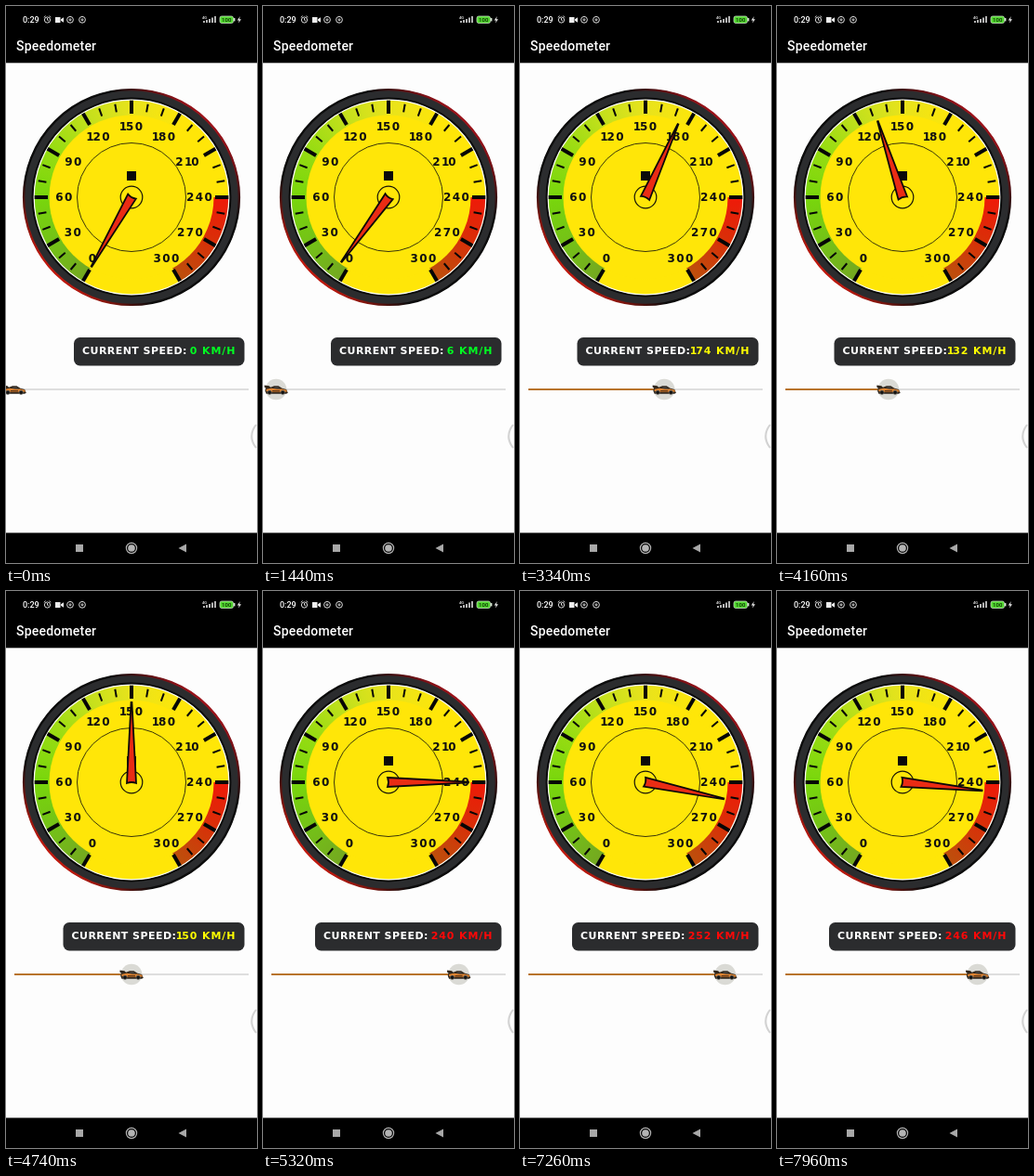
Animation, 270 px wide and 600 px high, one loop 8000 ms. Source, as an HTML page:

```html
<!DOCTYPE html>
<html lang="en">
<head>
<meta charset="utf-8">
<title>Speedometer</title>
<style>
  html, body { margin: 0; width: 100%; height: 100%; overflow: hidden; background: #fdfdfd; }
  #band, svg { position: absolute; }
  #band {
    left: 30px; top: 101px; width: 210px; height: 210px; border-radius: 50%;
    background: conic-gradient(from 210deg,
      #74a820 0deg, #74c018 28deg, #78d60c 60deg, #98dc12 92deg, #c4e01c 122deg,
      #e8e31c 150deg, #ffe608 185deg 240deg,
      #ee1a08 240deg, #dc2c08 265deg, #bc500c 300deg, #ffe608 300deg);
  }
  svg { left: 0; top: 0; display: block; }
  .ui { font-family: Roboto, sans-serif; font-weight: 500; fill: #fff; }
  .tech { font-family: "DejaVu Sans", sans-serif; font-weight: 700; }
  #labels { font-size: 12px; letter-spacing: 1.4px; text-anchor: middle; fill: #101010; }
  #readout { font-size: 11px; letter-spacing: .45px; }
  #value { letter-spacing: .9px; }
  .one { letter-spacing: -1.2px; }
</style>
</head>
<body>
<div id="band"></div>
<svg width="270" height="600" viewBox="0 0 270 600">
  <defs>
    <linearGradient id="rim" x1="0" y1="1" x2="1" y2="0">
      <stop offset=".12" stop-color="#e01c10"/>
      <stop offset=".3" stop-color="#0c0c0c"/>
      <stop offset=".7" stop-color="#0c0c0c"/>
      <stop offset=".88" stop-color="#b4141c"/>
    </linearGradient>
  </defs>

  <rect width="270" height="61.3"/>
  <g class="ui">
    <text x="18" y="18" font-size="9">0:29</text>
    <text x="11" y="48" font-size="14" letter-spacing=".2">Speedometer</text>
    <text x="211" y="14" font-size="4">4G</text>
  </g>
  <g fill="none" stroke="#ddd" stroke-width="1">
    <circle cx="44.5" cy="15" r="3.1"/>
    <path d="M44.5 13v2.2l1.4 .8M40.8 12.3l1.8-1.6M48.2 12.3l-1.8-1.6"/>
    <circle cx="69" cy="14.8" r="3.4"/><circle cx="69" cy="14.8" r="1"/>
    <circle cx="82" cy="14.8" r="3.4"/><circle cx="82" cy="14.8" r="1"/>
  </g>
  <path fill="#eee" d="M53 12h5.5v6H53zM59 14.2l3-2v5.6l-3-2z"/>
  <path stroke="#eee" stroke-width="1.5" d="M213 18v-2M216 18v-3M219 18v-4M222 18v-5.5M225 18v-7"/>
  <rect x="230" y="11" width="14.5" height="7.5" rx="2" fill="#52d830" stroke="#d8e8d4" stroke-width=".7"/>
  <rect x="245" y="13" width="1.4" height="3.4" fill="#d8e8d4"/>
  <text x="237.2" y="17" font-size="6" text-anchor="middle" class="ui" style="fill:#0c2804">100</text>
  <path d="M251.8 11l-3 4.4h2l-.8 3.2 3-4.4h-2z" fill="#eee"/>

  <g transform="translate(135 206)">
    <circle r="88.5" fill="#ffe608"/>
    <circle r="110.8" fill="none" stroke="#2b2c2e" stroke-width="11.5"/>
    <circle r="115.9" fill="none" stroke="url(#rim)" stroke-width="2.4"/>
    <circle r="106.4" fill="none" stroke="#0a0a0a" stroke-width="2"/>
    <circle r="104.8" fill="none" stroke="#fdfdf4" stroke-width="1.2"/>
    <g id="ticks" stroke="#060606"></g>
    <circle r="58.5" fill="none" stroke="#22200a" stroke-width=".9"/>
    <rect x="-5" y="-28" width="10" height="10" fill="#0a0a0a"/>
    <circle r="11.8" fill="#ffe608" stroke="#141208" stroke-width="1.2"/>
  </g>
  <g id="labels" class="tech"></g>
  <path id="needle" d="M-5 1L-.4-86H.4L5 1Q0-1-5 1Z" fill="#ea2c14" stroke="#0c0808" stroke-width="1.8"/>

  <g id="readout" class="tech">
    <rect id="box" y="357" height="30.5" rx="6.5" fill="#2b2c2e"/>
    <text id="caption" y="375" fill="#fff">CURRENT SPEED:</text>
    <text id="value" x="247.4" y="375" text-anchor="end"></text>
  </g>

  <path d="M9 413H261" stroke="#dedede" stroke-width="1.8"/>
  <path id="active" stroke="#b8742c" stroke-width="1.8"/>
  <g id="thumb">
    <circle id="halo" r="11.3" fill="#d6d6d0" opacity=".9"/>
    <g transform="translate(0 .8)">
      <path d="M-12.5-5.2l5 .6 1.5 1.6L-2-4.6H2.500l4 2.600 4.600 1.200L12.800 3 11 4h-21.500l-1.300-3 .6-3.600-1.300-.4z" fill="#30261c"/>
      <path d="M-10.500-1L-5-2 1-1.400l5 .200 5.400 1.200.4 1.600-6.800.4h-8.500l-7-.8z" fill="#e08430"/>
      <path d="M-3-1.800L-1-3.600H1.800L4.800-1.400z" fill="#44403c"/>
      <path d="M-4 .9H4" stroke="#4a2a14" stroke-width="1.100"/>
      <g fill="#131313" stroke="#807c74" stroke-width=".6">
        <circle cx="-7" cy="2.500" r="2.200"/><circle cx="7.200" cy="2.500" r="2.200"/>
      </g>
    </g>
  </g>

  <path d="M269 451Q259.500 463.500 269 476" fill="none" stroke="#d2d2d2" stroke-width="2"/>

  <rect y="567.5" width="270" height="32.5"/>
  <rect x="75" y="580" width="8" height="8" fill="#a8a8a8"/>
  <circle cx="135" cy="584" r="5.6" fill="none" stroke="#b4b4b4" stroke-width="1.2"/>
  <circle cx="135" cy="584" r="3.8" fill="#b4b4b4"/>
  <path d="M194 579.5v9l-8.500-4.500z" fill="#a8a8a8"/>
</svg>
<script>
  const $ = id => document.getElementById(id);
  const LOOP = 8000, STEP = 6, MAX = 300;

  // [ms, km/h] along the drag
  const drag = [
    [0, 0], [1200, 0], [2060, 25], [2350, 80], [3300, 176], [3380, 176],
    [4160, 132], [4490, 126], [4580, 126], [5290, 240], [5400, 240],
    [6420, 252], [7050, 252], [7860, 246], [8000, 246]
  ];

  const narrowOnes = s => s.replace(/1/g, '<tspan class="one">1</tspan>');

  function buildDial() {
    let ticks = '';
    for (let v = 0; v <= MAX; v += 10) {
      const major = v % 30 === 0;
      ticks += `<path d="M0 ${major ? -90 : -93}V${major ? -104.3 : -101.8}"
        stroke-width="${major ? 4 : 2}" transform="rotate(${v - 150})"/>`;
    }
    $('ticks').innerHTML = ticks;

    const xs = [93, 72, 62.5, 72.5, 99, 134.5, 169.5, 195, 208, 198, 172.5];
    const ys = [272, 244, 206, 168, 141, 130];
    $('labels').innerHTML = xs.map((x, i) =>
      `<text x="${x + 0.6}" y="${ys[Math.min(i, 10 - i)] + 4.3}">${narrowOnes(String(i * 30))}</text>`
    ).join('');
  }

  function speedAt(t) {
    let i = 1;
    while (i < drag.length - 1 && t > drag[i][0]) i++;
    const [t0, v0] = drag[i - 1], [t1, v1] = drag[i];
    const v = v0 + (v1 - v0) * (t - t0) / (t1 - t0);
    return Math.round(v / STEP) * STEP;
  }

  const tint = v => v <= 100 ? '#00ff22' : v <= 200 ? '#ffff00' : '#ff0808';

  function showSpeed(v) {
    const digits = String(v);
    const extra = [...digits].reduce((w, d) => w + (d === '1' ? 3 : 8.5), -8.5);
    const left = 73 - extra;
    $('box').setAttribute('x', left);
    $('box').setAttribute('width', 256.5 - left);
    $('caption').setAttribute('x', left + 9);
    $('value').innerHTML = narrowOnes(digits) + ' KM/H';
    $('value').setAttribute('fill', tint(v));

    const x = 9 + v * 0.84;
    $('needle').setAttribute('transform', `translate(135 206) rotate(${v - 150})`);
    $('thumb').setAttribute('transform', `translate(${x} 413)`);
    $('active').setAttribute('d', `M9 413H${x}`);
  }

  const start = performance.now();
  let shown = -1;

  function frame() {
    const t = (performance.now() - start) % LOOP;
    const v = speedAt(t);
    if (v !== shown) showSpeed(shown = v);
    $('halo').setAttribute('visibility', t < 410 ? 'hidden' : 'visible');
    requestAnimationFrame(frame);
  }

  buildDial();
  frame();
</script>
</body>
</html>
```
